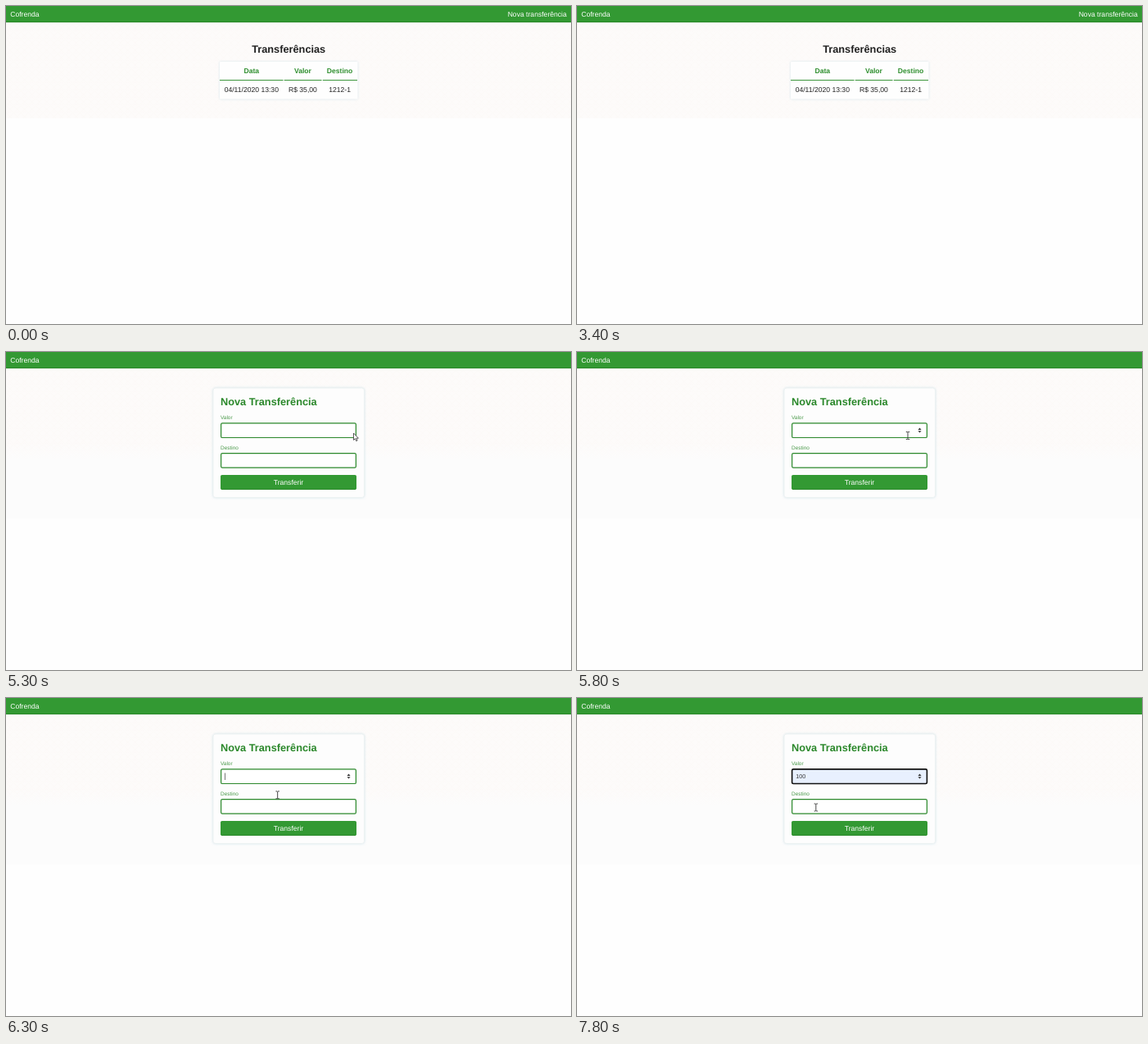
An HTML page for the animation above (8000 ms loop, 690 px wide and 388 px high).

```html
<!DOCTYPE html>
<html lang="pt">
<head>
<meta charset="utf-8">
<title>Transferências</title>
<style>
  html, body { margin: 0; width: 100%; height: 100%; overflow: hidden; background: #fefefe; }
  svg { display: block; width: 690px; height: 388px; }
  text { font: 8.6px "Liberation Sans", Arial, sans-serif; text-rendering: geometricPrecision; fill: #212121; }
  .nav, .button { fill: #fff; }
  .title { font-size: 12.75px; font-weight: bold; }
  .green { fill: #2b882b; }
  .head { font-weight: bold; fill: #2f8f2f; }
  .label { font-size: 6.45px; fill: #4b9a4b; }
  .value { font-size: 7.15px; fill: #333; }
  .mid { text-anchor: middle; }
  .end { text-anchor: end; }
  .field { fill: #fff; stroke: #2b882b; stroke-width: 1.2; }
</style>
</head>
<body>
<svg viewBox="0 0 690 388" xmlns="http://www.w3.org/2000/svg">
  <defs>
    <pattern id="weave" width="9" height="9" patternUnits="userSpaceOnUse">
      <rect width="9" height="9" fill="#fdfbfa"/>
      <path d="M0 4.5 4.5 0 9 4.5 4.5 9Z M2.5 4.5 4.5 2.5 6.5 4.5" fill="none" stroke="#fbf8f6" stroke-width=".8"/>
    </pattern>
    <linearGradient id="fade" x2="0" y2="1">
      <stop offset="0" stop-color="#fcfcfc" stop-opacity="0"/>
      <stop offset="1" stop-color="#fcfcfc"/>
    </linearGradient>
    <filter id="glow" x="-10%" y="-20%" width="120%" height="140%">
      <feDropShadow dx="0" dy="0" stdDeviation="1.4" flood-color="#b8d4e0" flood-opacity=".6"/>
    </filter>
  </defs>

  <rect width="690" height="388" fill="#fefefe"/>

  <g id="list">
    <rect y="20" width="690" height="117" fill="url(#weave)"/>
    <text class="title mid" x="345.2" y="56.5">Transferências</text>
    <rect x="261" y="68" width="168.5" height="45.5" rx="1" fill="#fefefe" filter="url(#glow)"/>
    <path d="M261 90.5H338.5M339.7 90.5H385.5M386.8 90.5H429" stroke="#3c963c" stroke-width="1.1"/>
    <g id="cells"></g>
  </g>

  <g id="form">
    <rect y="20" width="690" height="183" fill="#fcfcfc"/>
    <rect y="20" width="690" height="112" fill="url(#weave)"/>
    <rect y="112" width="690" height="20" fill="url(#fade)"/>
    <rect x="253" y="44" width="184.5" height="133.5" rx="3" fill="#fdfdfd" stroke="#eaf0f0" stroke-width=".8" filter="url(#glow)"/>
    <text class="title green" x="262" y="65.3">Nova Transferência</text>
    <text class="label" x="262" y="82.3">Valor</text>
    <text class="label" x="262" y="119.2">Destino</text>
    <rect id="amount" class="field" x="262.6" y="86.9" width="164.8" height="17.6" rx="1.6"/>
    <rect class="field" x="262.6" y="123.6" width="164.8" height="17.6" rx="1.6"/>
    <text id="value" class="value" x="267.3" y="98.2">100</text>
    <rect id="caret" y="91.5" width=".8" height="8.5" fill="#555"/>
    <path id="spinner" d="M416.4 95 418.5 92.6 420.6 95ZM416.4 96.2 418.5 98.6 420.6 96.2Z" fill="#333"/>
    <rect x="262" y="150" width="166" height="18" rx="1.8" fill="#339933"/>
    <path d="M263 167.6H427" stroke="#278427" stroke-width=".8"/>
    <text class="button mid" x="345" y="161.8">Transferir</text>
  </g>

  <rect width="690" height="20" fill="#339933"/>
  <path d="M0 19.6H690" stroke="#278427" stroke-width=".8"/>
  <text class="nav" x="5.2" y="13">Cofrenda</text>
  <text id="link" class="nav end" x="684.8" y="13">Nova transferência</text>

  <path id="arrow" d="M0 0V8.4L1.9 6.7 3.2 9.6 4.6 9 3.3 6.2H5.9Z" fill="#fff" stroke="#333" stroke-width=".8" stroke-linejoin="round"/>
  <path id="beam" d="M-2.2-4.5H-.5L0-4 .5-4.5H2.2M0-4V4M-2.2 4.5H-.5L0 4 .5 4.5H2.2" fill="none" stroke="#333" stroke-width=".9"/>
</svg>
<script>
const LOOP = 8000, STEP = 100;
const OPEN = 4900, HOVER = 5400, CLICK = 5900, PREVIEW = 6400, PICK = 7300;
const $ = id => document.getElementById(id);
const show = (id, on) => $(id).setAttribute("visibility", on ? "inherit" : "hidden");

const columns = [
  [299.8, "Data", "04/11/2020 13:30"],
  [362.4, "Valor", "R$ 35,00"],
  [407.6, "Destino", "1212-1"]
];
$("cells").innerHTML = columns.map(([x, head, cell]) =>
  `<text class="head mid" x="${x}" y="82.4">${head}</text><text class="mid" x="${x}" y="105">${cell}</text>`).join("");

// Pointer path: time, x, y
const path = [
  [4900, 637.5, 12], [5000, 597, 32], [5100, 506, 77], [5200, 448, 94], [5300, 424.5, 99],
  [5600, 408, 102], [5800, 404, 102], [6200, 345.5, 103.5], [6500, 304, 148],
  [6600, 298.3, 142], [7400, 298.3, 141.5], [7500, 296.5, 139.5], [7800, 291.8, 133.5]
];

function pointerAt(t) {
  const next = path.findIndex(p => p[0] > t);
  if (next < 0) return path[path.length - 1].slice(1);
  const [t0, x0, y0] = path[Math.max(0, next - 1)];
  const [t1, x1, y1] = path[next];
  const k = Math.max(0, (t - t0) / (t1 - t0));
  return [x0 + (x1 - x0) * k, y0 + (y1 - y0) * k];
}

function caretOn(t) {
  if (t < CLICK) return false;
  if (t < PICK) return t < PREVIEW ? (t - CLICK) % 1000 < 500 : t < 7000;
  return t < PICK + 500;
}

function render(time) {
  const t = Math.floor(time / STEP) * STEP;
  const opened = t >= OPEN, filled = t >= PREVIEW;
  const beam = t >= HOVER && t < PREVIEW || t >= 7500;
  show("list", !opened);
  show("link", !opened);
  show("form", opened);
  show("value", filled && opened);
  show("spinner", t >= HOVER);
  show("caret", caretOn(t));
  $("caret").setAttribute("x", t < PICK ? 267 : 279.8);
  $("amount").style.cssText = filled ? "fill:#e8f0fe;stroke:#101010;stroke-width:1.6" : "";
  show("arrow", opened && !beam);
  show("beam", beam);
  const place = `translate(${pointerAt(t)})`;
  $("arrow").setAttribute("transform", place);
  $("beam").setAttribute("transform", place);
}

const start = performance.now();
function tick() {
  render((performance.now() - start) % LOOP);
  requestAnimationFrame(tick);
}
tick();
</script>
</body>
</html>
```
